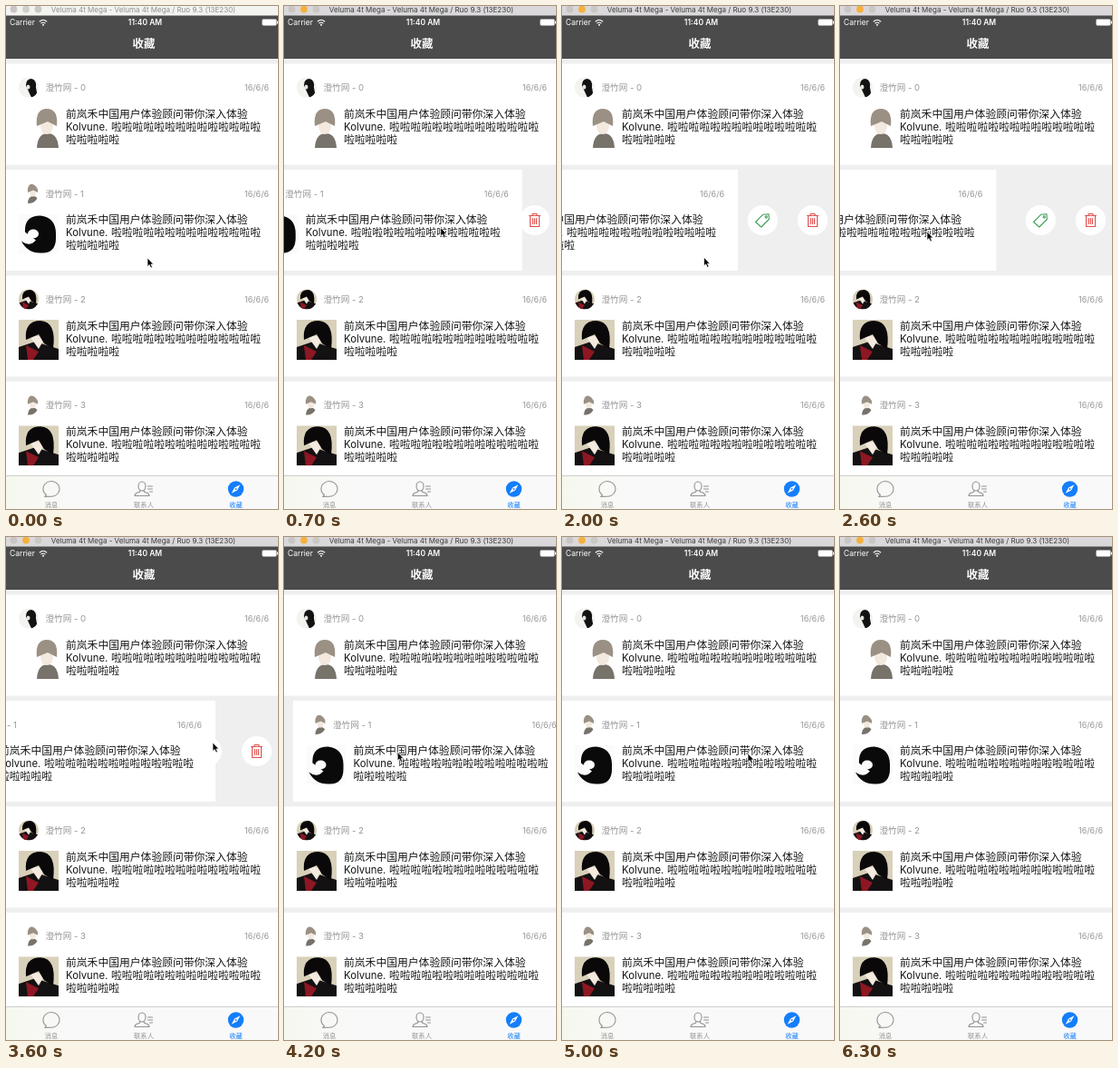
An HTML page that plays this animation: 300x553 px, repeating every 6.4 s.

```html
<!DOCTYPE html>
<html lang="zh-CN">
<head>
<meta charset="utf-8">
<style>
  html, body { margin: 0; width: 100%; height: 100%; overflow: hidden; background: #efefef; }
  svg { display: block; width: 300px; height: 553px; }
  text { font-family: Inter, "Noto Sans CJK SC", "Noto Sans CJK", sans-serif; }
  .body { font-size: 11.8px; fill: #151515; }
  .latin { font-size: 11.3px; fill: #151515; }
  .meta { font-size: 9.6px; fill: #979797; }
  .date { font-size: 9px; fill: #979797; text-anchor: end; }
  .tab { font-size: 7.3px; fill: #929292; text-anchor: middle; }
  .tab.on { fill: #147efb; }
  .bar { fill: #fff; text-anchor: middle; }
  .line { fill: none; stroke-linecap: round; stroke-linejoin: round; stroke-width: 1.1; }
</style>
</head>
<body>
<svg viewBox="0 0 300 553">
  <defs>
    <clipPath id="round"><circle cx="22" cy="22" r="22"/></clipPath>
    <clipPath id="square"><rect width="44" height="44"/></clipPath>
    <linearGradient id="tint">
      <stop offset="0" stop-color="#f6f8ee"/>
      <stop offset="1" stop-color="#f9f9f9"/>
    </linearGradient>

    <g id="boy">
      <rect width="44" height="44" fill="#fff"/>
      <path d="M20 44Q21 28 32 28Q43 28 44 44Z" fill="#77726a"/>
      <ellipse cx="31" cy="20" rx="7" ry="9" fill="#f3e9df"/>
      <path d="M20 20Q18 1 31 1Q44 1 42 20L32 15Z" fill="#9b9084"/>
    </g>
    <g id="ink">
      <rect width="44" height="44" fill="#fbfbfb"/>
      <path d="M7 20Q6 2 24 2Q42 4 41 24Q42 43 26 43Q10 44 3 30Q12 37 19 29Z" fill="#0a0a0a"/>
      <ellipse cx="16" cy="22" rx="6" ry="5" fill="#fbfbfb"/>
    </g>
    <g id="red">
      <rect width="44" height="44" fill="#d8d0b9"/>
      <path d="M0 44V30L18 24L44 32V44Z" fill="#141113"/>
      <path d="M12 18H30L22 32Z" fill="#f4eadf"/>
      <path d="M8 22Q6 1 24 1Q42 2 38 32L28 26L22 16Z" fill="#0a0809"/>
      <path d="M8 28L22 35L16 44H10Z" fill="#8d1722"/>
    </g>
    <g id="dark">
      <rect width="44" height="44" fill="#f1f4ef"/>
      <path d="M16 18Q16 3 28 3Q40 5 38 22L42 44H28Z" fill="#121212"/>
      <ellipse cx="21" cy="21" rx="4" ry="5" fill="#e7e3de"/>
    </g>
  </defs>

  <rect width="300" height="553" fill="#efefef"/>

  <g id="actions" transform="translate(221.3 235.5)">
    <circle r="16.6" fill="#fff"/>
    <g class="line" stroke="#43a05a">
      <path d="M-7.8 2L.2 -6.2L6.7 -6.7L7 -1L-1.5 7.5Z"/>
      <circle cx="3.9" cy="-3.5" r="1.1"/>
    </g>
    <g transform="translate(55.2)">
      <circle r="16.6" fill="#fff"/>
      <path class="line" stroke="#e0504f" d="M-6 -5H6M-2.5 -5V-7H2.5V-5M-5 -5V7H5V-5M-2 -2V4M0 -2V4M2 -2V4"/>
    </g>
  </g>

  <g id="rows"></g>

  <g id="tabs">
    <rect y="516" width="300" height="37" fill="#f9f9f9"/>
    <rect y="516" width="75" height="37" fill="url(#tint)"/>
    <path d="M0 516.5H300" stroke="#bdbdbd" stroke-width=".7"/>
    <g class="line" stroke="#929292">
      <path d="M44.5 537.5A9 8.3 0 1 1 50 539.2L42.8 539.4Z"/>
      <ellipse cx="150" cy="528" rx="4" ry="5"/>
      <path d="M148 532.5Q148 535 145 535Q142 536 142 538.5H158Q158 536 155 535Q152 535 152 532.5M156.5 528H161.5M156.5 531H161.5M158.5 534H161.5"/>
    </g>
    <g transform="translate(253.5 531)">
      <circle r="8.7" fill="#147efb"/>
      <path d="M4.8 -4.8L1.5 1.5L-4.8 4.8L-1.5 -1.5Z" fill="#fff"/>
      <circle r="1" fill="#147efb"/>
    </g>
    <text class="tab" x="50" y="550.5">消息</text>
    <text class="tab" x="152" y="550.5">联系人</text>
    <text class="tab on" x="253.5" y="550.5">收藏</text>
  </g>

  <g id="header">
    <rect y="10" width="300" height="48" fill="#4b4b4b"/>
    <text class="bar" x="18" y="21.4" font-size="8.5">Carrier</text>
    <path class="line" stroke="#fff" d="M37.2 17Q41 13.6 44.8 17M38.9 18.9Q41 17 43.1 18.9"/>
    <circle cx="41" cy="20.8" r="1" fill="#fff"/>
    <text class="bar" x="153.5" y="21.4" font-size="8.5" font-weight="600">11:40 AM</text>
    <rect x="282.5" y="14.5" width="16" height="7" rx="1.4" fill="#fff"/>
    <rect x="299" y="16.6" width="1" height="2.8" fill="#fff"/>
    <text class="bar" x="152" y="46" font-size="12.4" font-weight="600">收藏</text>
  </g>

  <g id="titlebar">
    <rect id="bar" width="300" height="10.5"/>
    <circle cx="8.5" cy="3.5" r="3.9" fill="#c9c5c5"/>
    <circle id="light" cx="22" cy="3.5" r="3.9"/>
    <circle cx="35.5" cy="3.5" r="3.9" fill="#c9c8c5"/>
    <text id="title" x="151.5" y="6.5" font-size="8" text-anchor="middle">Veluma 4t Mega - Veluma 4t Mega / Ruo 9.3 (13E230)</text>
  </g>

  <path id="cursor" d="M0 0V9.4L2.2 7.5L3.7 11L5.4 10.2L3.9 6.9H6.7Z" stroke="#fff" stroke-width=".7"/>
</svg>

<script>
const LOOP = 6400, STEP = 100, SNAP = 300;
const OPEN = -111, CLOSED = 0, STRETCH = 0.4;
const TOP = 63.6, PITCH = 116.4;

// Pointer stops: time, x, y and, when reached by dragging, where the row settles
const stops = [
  [0, 156, 277],
  [500, 215, 244], [1000, 95, 243, OPEN],
  [1500, 183, 391],
  [2200, 150, 248], [2600, 96, 248, OPEN],
  [3300, 191, 228], [3600, 228, 226, CLOSED],
  [3960, 99, 236], [4700, 205, 238, CLOSED],
  [5000, 205, 238], [5600, 225, 565], [LOOP, 225, 565]
];
const PRESS = stops[1][0];

const $ = id => document.getElementById(id);
const move = (id, x, y) => $(id).setAttribute('transform', `translate(${x} ${y})`);
const paint = (id, color) => $(id).setAttribute('fill', color);
const mix = (a, b, u) => a + (b - a) * u;
const ease = u => { u = Math.min(1, Math.max(0, u)); return u * u * (3 - 2 * u); };

const la = n => '啦'.repeat(n);
const row = ([avatar, picture], i) => `
  <g id="row${i}" transform="translate(0 ${TOP + i * PITCH})">
    <rect x="-.6" width="305.6" height="111" fill="#fff"/>
    <g transform="translate(14 15) scale(.5)"><use href="#${avatar}" clip-path="url(#round)"/></g>
    <g transform="translate(14 48.5)"><use href="#${picture}" clip-path="url(#square)"/></g>
    <text class="meta" x="43.5" y="29.6">澄竹网 - ${i}</text>
    <text class="date" x="290" y="29.5">16/6/6</text>
    <text class="body" x="66" y="59.3">前岚禾中国用户体验顾问带你深入体验</text>
    <text class="latin" x="66" y="73.3">Kolvune.</text>
    <text class="body" x="116" y="73.3">${la(14)}</text>
    <text class="body" x="66" y="87.3">${la(5)}</text>
  </g>`;
$('rows').innerHTML =
  [['dark', 'boy'], ['boy', 'ink'], ['red', 'red'], ['boy', 'red']].map(row).join('');

function pointer(t) {
  const i = Math.max(1, stops.findIndex(s => s[0] >= t));
  const [t0, x0, y0] = stops[i - 1], [t1, x1, y1] = stops[i];
  const u = ease((t - t0) / (t1 - t0));
  return [mix(x0, x1, u), mix(y0, y1, u)];
}

// Past either end the row follows the pointer only in part
function band(x) {
  const inside = Math.min(CLOSED, Math.max(OPEN, x));
  return inside + (x - inside) * STRETCH;
}

function rowOffset(t) {
  let base = CLOSED, x = base;
  for (let i = 1; i < stops.length && t >= stops[i - 1][0]; i++) {
    const [end, , , rest] = stops[i];
    if (rest === undefined) continue;
    const pulled = band(base + pointer(Math.min(t, end))[0] - stops[i - 1][1]);
    x = mix(pulled, rest, ease((t - end) / SNAP));
    base = rest;
  }
  return x;
}

function draw() {
  const t = Math.floor(performance.now() % LOOP / STEP) * STEP;
  const active = t >= PRESS;
  move('row1', rowOffset(t), TOP + PITCH);
  move('cursor', ...pointer(t));
  paint('bar', active ? '#dad8da' : '#f3f4f0');
  paint('light', active ? '#f5b13d' : '#cfcfcc');
  paint('title', active ? '#3c3c3c' : '#8f8f8f');
  requestAnimationFrame(draw);
}
draw();
</script>
</body>
</html>
```
